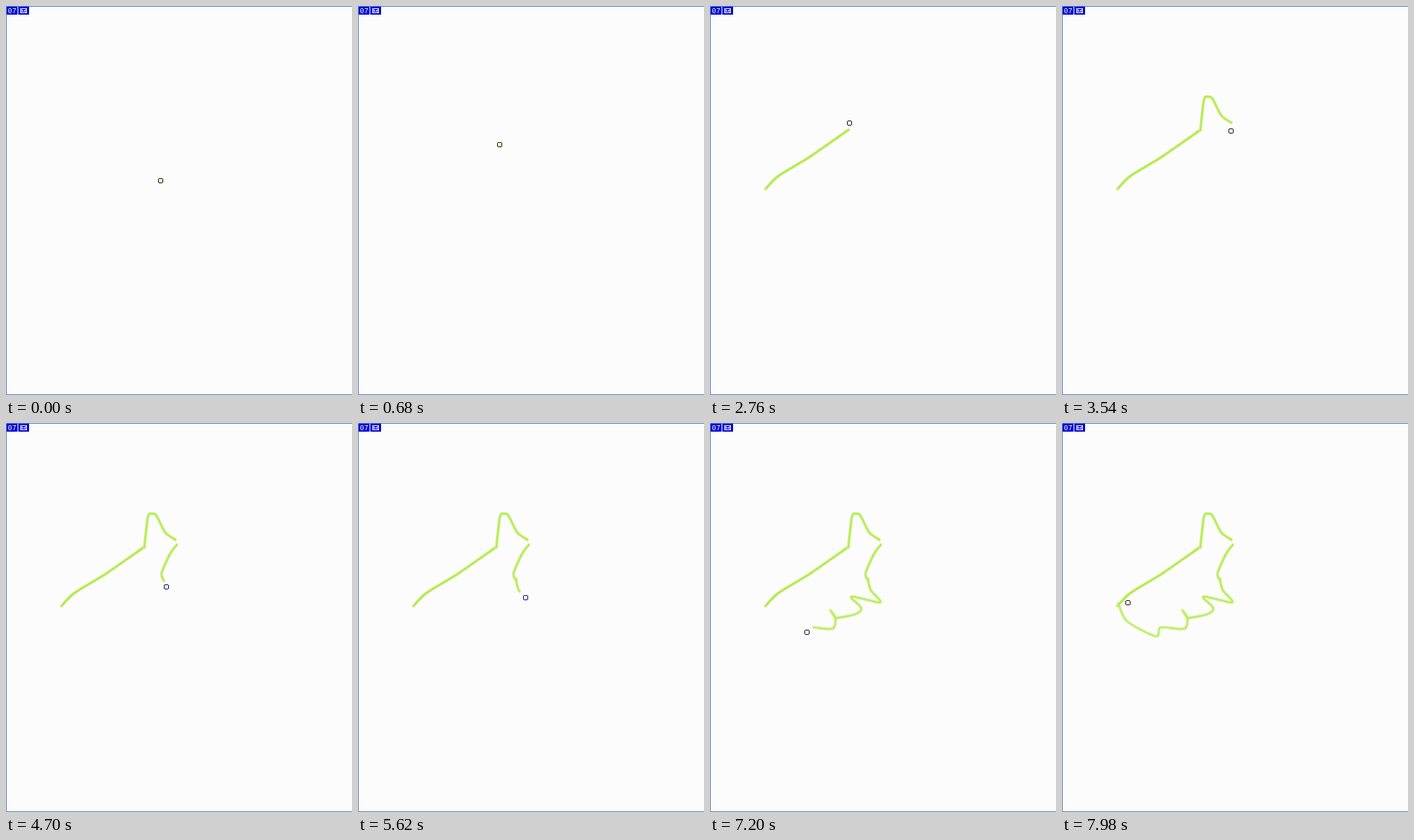
Write an HTML page that moves like this. It is 480 px wide and 540 px high and loops after 8 s.

```html
<!DOCTYPE html>
<html lang="en">
<head>
<meta charset="utf-8">
<title>Sketch</title>
<style>
html, body { margin: 0; width: 100%; height: 100%; overflow: hidden; background: #fcfcfc; }
svg { display: block; width: 480px; height: 540px; }
text { font: 10px "Liberation Mono", "DejaVu Sans Mono", monospace; fill: #fff; }
.ink { fill: none; stroke-linecap: round; stroke-linejoin: round; }
.soft { stroke: #d8f49c; stroke-width: 4.8; stroke-opacity: .6; }
.core { stroke: #b4eb4e; stroke-width: 2.8; }
</style>
</head>
<body>
<svg viewBox="0 0 480 540">
  <rect width="480" height="540" fill="#fcfcfc"/>
  <path d="M480 .5H.5V539.5H480" fill="none" stroke="#5c80c4"/>
  <g id="ink"></g>
  <g shape-rendering="crispEdges">
    <path d="M1 1h15v11h-15zM17 1h15v11h-15z" fill="#0000d4"/>
    <path d="M20.5 3.5h8v6h-8zM21 5l3.5 2.5L28 5M21 9l2-2M28 9l-2-2" fill="none" stroke="#fff"/>
  </g>
  <text x="2.5" y="10">07</text>
  <g id="cursor" shape-rendering="crispEdges">
    <path id="halo" d="M-3-4h7v1h1v7h-1v1h-7v-1h-1v-7h1z"/>
    <path id="ring" fill-rule="evenodd" d="M-2-3h5v1h1v5h-1v1h-5v-1h-1v-5h1zM-2-2v5h5v-5z"/>
  </g>
</svg>
<script>
const LOOP = 8000, STEP = 20, LAG = 70;
const $ = id => document.getElementById(id);
const clamp = (v, lo, hi) => Math.max(lo, Math.min(hi, v));
const moves = [];
let last = [214, 242], pressure = 1;

// Both continue from where the pointer last stopped
function hover(start, end, points) {
  addMove(start, end, points, []);
}
function stroke(start, end, points) {
  addMove(start, end, points, ['soft', 'core']);
  pressure -= .05;
}

function addMove(start, end, points, kinds) {
  const pts = [last, ...points.split(' ').map(p => p.split(',').map(Number))];
  const d = smooth(pts);
  const path = makePath(d, '');
  const layers = kinds.map(kind => makePath(d, kind));
  $('ink').append(...layers);
  moves.push({ start, end, path, layers, length: path.getTotalLength() });
  last = pts[pts.length - 1];
}

function makePath(d, kind) {
  const p = document.createElementNS('http://www.w3.org/2000/svg', 'path');
  p.setAttribute('d', d);
  p.setAttribute('class', 'ink ' + kind);
  p.setAttribute('opacity', pressure);
  return p;
}

// Rounded curve through all points
function smooth(pts) {
  const at = i => pts[clamp(i, 0, pts.length - 1)];
  const handle = (i, sign) => [0, 1].map(k => at(i)[k] + sign * (at(i + 1)[k] - at(i - 1)[k]) / 7);
  let d = 'M' + pts[0];
  for (let i = 1; i < pts.length; i++) d += `C${handle(i - 1, 1)} ${handle(i, -1)} ${pts[i]}`;
  return d;
}

hover(0, 680, '210,271 202,225 196,192');
hover(680, 1640, '190,117 89,244');
hover(1840, 1860, '77,254');
stroke(1860, 1940, '95,236 139,209 192,172');           // back
hover(1940, 2020, '178,177');
hover(2020, 2640, '195,162 192,172');
stroke(2700, 3300, '197,130 203,126 209,129 221,152 235,162'); // ear
hover(3300, 3540, '242,178 234,173');
hover(3540, 3960, '239,166 237,169');
stroke(4100, 4620, '228,181 216,208 219,219');          // face
hover(4620, 4700, '222,227');
hover(4700, 5220, '224,244 220,206 219,216');
stroke(5440, 6280, '223,232 236,249 196,241 210,257 200,266 174,271'); // jaw
stroke(6280, 7080, '167,260 174,271 171,285 154,285');
stroke(7080, 7600, '136,284 130,296 90,275 78,250');    // belly
hover(7600, 7980, '89,238 80,260 91,249');

const progress = (m, t) => clamp((t - m.start) / (m.end - m.start), 0, 1);
const ease = p => p * p * (3 - 2 * p);

function draw(t) {
  let current = moves[0];
  for (const m of moves) {
    if (m.start <= t) current = m;
    const shown = progress(m, t - LAG) * m.length;
    for (const p of m.layers) {
      p.style.display = shown > 0 ? '' : 'none';
      p.style.strokeDasharray = shown >= m.length ? 'none' : `${shown} ${m.length + 9}`;
    }
  }
  const p = progress(current, t);
  const pos = current.path.getPointAtLength((current.layers.length ? p : ease(p)) * current.length);
  $('cursor').setAttribute('transform', `translate(${Math.round(pos.x)} ${Math.round(pos.y)})`);
  const navy = (t >= 1860 && t < 2700) || (t >= 4100 && t < 6400);
  $('ring').setAttribute('fill', navy ? '#000070' : '#101010');
  $('halo').setAttribute('fill', t < 1860 ? '#fdfbd8' : '#fcfcfc');
}

const begin = performance.now();
function tick() {
  const t = (performance.now() - begin) % LOOP;
  draw(t - t % STEP);
  requestAnimationFrame(tick);
}
tick();
</script>
</body>
</html>
```
